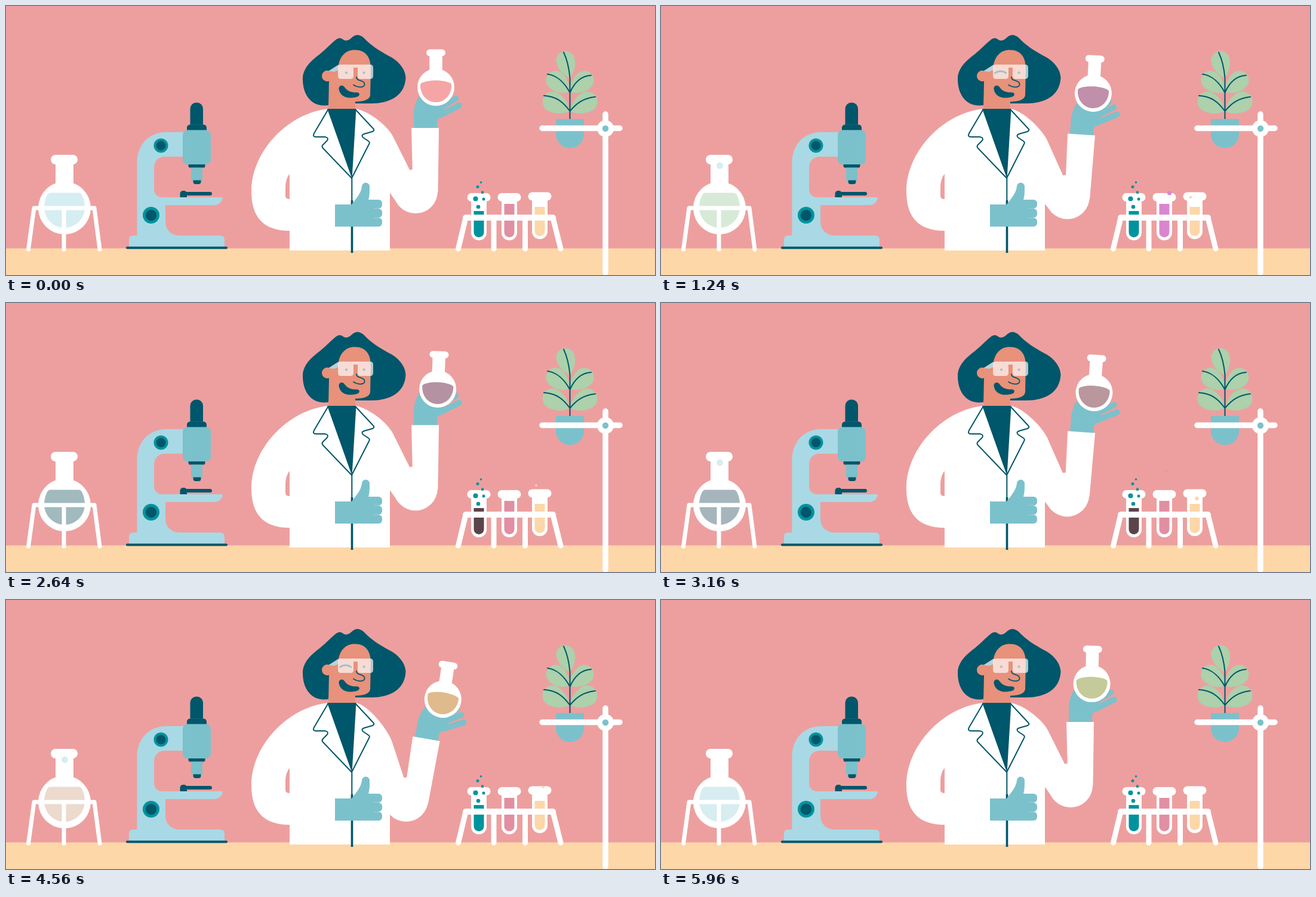
Recreate the animation shown at these times as an HTML page with a canvas. Size 1087 by 450 pixels, loop 6 s.

```html
<!DOCTYPE html>
<html lang="en">
<head>
<meta charset="utf-8">
<title>Laboratory</title>
<style>
html, body { margin: 0; width: 100%; height: 100%; overflow: hidden; background: #ed9f9f; }
canvas { display: block; width: 1087px; height: 450px; }
</style>
</head>
<body>
<canvas id="stage"></canvas>
<script>
const W = 1087, H = 450, LOOP = 6000, STEP = 40, RAD = Math.PI / 180;
const PINK = '#ed9f9f', WHITE = '#ffffff', DARK = '#00566a', TEAL = '#00939d', GOLD = '#fdd7a8';
const GLOVE = '#7bc1cb', PALE = '#a9d9e5', SKIN = '#e8917b', ICE = '#d6edf1', LEAF = '#acd1ab';
const GLASS = 'rgba(255, 255, 255, 0.68)', EYE = '#9fc3ca';
const canvas = document.getElementById('stage');
const g = canvas.getContext('2d');
const ratio = window.devicePixelRatio || 1;
canvas.width = W * ratio;
canvas.height = H * ratio;
g.lineJoin = 'round';

// Drawing helpers
function fill(d, color) {
  g.fillStyle = color;
  g.fill(new Path2D(d));
}
function line(d, color, width, cap = 'round') {
  g.strokeStyle = color;
  g.lineWidth = width;
  g.lineCap = cap;
  g.stroke(new Path2D(d));
}
function disc(x, y, r, color) {
  g.fillStyle = color;
  g.beginPath();
  g.arc(x, y, r, 0, 2 * Math.PI);
  g.fill();
}
function box(x, y, w, h, r, color) {
  g.fillStyle = color;
  g.beginPath();
  g.roundRect(x, y, w, h, r);
  g.fill();
}

// Motion helpers
const clamp = u => Math.min(1, Math.max(0, u));

// Rises from 0 to 1 after `from` and falls back before `to`
const ramp = (t, from, to, ease) => clamp(Math.min(t - from, to - t) / ease);

// One dip and return; skew above 1 delays the peak
function swing(t, from, to, size, skew) {
  const u = clamp((t - from) / (to - from)) ** skew;
  return size * (1 - Math.cos(2 * Math.PI * u)) / 2;
}

function mix(a, b, u) {
  const part = i => {
    const v = parseInt(a.slice(i, i + 2), 16), w = parseInt(b.slice(i, i + 2), 16);
    return Math.round(v + (w - v) * u);
  };
  return `rgb(${part(1)}, ${part(3)}, ${part(5)})`;
}

// Colours spread evenly over the loop
function fade(t, colors) {
  const p = t / LOOP * (colors.length - 1), i = Math.floor(p);
  return mix(colors[i], colors[i + 1], p - i);
}

const TURN = 2580, REST = 5900;
const armDrop = t => swing(t, 0, TURN, 14.5, 1.6) + swing(t, TURN, REST, 29, 0.9);
const flaskDrop = t => swing(t, 0, TURN, 14, 2) + swing(t, TURN, LOOP, 26, 1)
  + 8 * Math.min(t / TURN, 1 - (t - TURN) / 6800);

const flaskColors = ['#f6a5a6', '#c38fab', '#b690a5', '#b3939f', '#dbae8d', '#e2c48c', '#c4ca9c'];
const bowlColors = [ICE, '#e5f5de', '#a9c7c6', '#9cb3ba', '#d8c2be', '#fbecda', ICE];

// A bubble pops up at each spot [x, y, r, hold] in turn
function rise(t, start, spots, color) {
  for (const [x, y, r, hold = 950] of spots) {
    const u = ramp(t, start, start + hold, 120);
    disc(x, y, r * Math.sin(u * Math.PI / 2), color);
    start += hold;
  }
}

function bowl(t) {
  box(75, 249, 45, 16, 8, WHITE);
  box(83, 258, 30, 46, 0, WHITE);
  disc(98, 338, 44, WHITE);
  fill('M74 312.5H122Q125 312.5 127 316C130 322 132 329 132 337A34 34 0 0 1 64 337C64 329 66 322 69 316Q71 312.5 74 312.5Z', fade(t, bowlColors));
  line('M47 338H148M47 338L37.5 407M148 338L157 407M97 338V407', WHITE, 7);
  for (let k = 0; k < 3; k++)
    rise(t, 350 + 1550 * k, [[93, 304, 4.7, 400], [106, 287, 3.2, 350], [98.5, 267, 5.5, 790], [88, 239, 3.2, 750]], ICE);
}

function microscope() {
  fill('M219.5 386V262C219.5 232 240 211 268 211H300V252H266C255 252 248 260 248 270V306C248 314 253 320 262 320H363C362 328 357 333 348 333H267V360C267 375 277 384 292 384H358Q366 384 366 391V404H206V391Q206 384 213 384H219.5Z', PALE);
  line('M203 404.5H369', DARK, 4.2);
  box(308.5, 161.5, 21.5, 38, [10.5, 10.5, 0, 0], DARK);
  box(303, 198.5, 33, 10, [5, 5, 0, 0], DARK);
  line('M309 198.5H330', '#1f6d76', 0.7);
  box(296, 207.5, 47, 57.5, 8, GLOVE);
  box(305.5, 265, 28, 5.5, [0, 0, 3, 3], DARK);
  box(310, 270.5, 19, 21.5, 0, GLOVE);
  box(313.5, 291.5, 13, 6.5, [0, 0, 4, 4], DARK);
  box(296, 311, 49, 6, 3, DARK);
  box(291.5, 309, 11.5, 11, [5, 5, 0, 0], DARK);
  for (const [x, y, r] of [[259.5, 233.5, 12], [243, 350, 14]]) {
    disc(x, y, r, TEAL);
    disc(x, y, r * 0.66, DARK);
  }
}

function tube(x, top, level, foot, color) {
  box(x - 19.5, top, 39, 14, 7, WHITE);
  box(x - 13, top + 6, 26, foot - top - 6, [0, 0, 13, 13], WHITE);
  box(x - 8.5, level, 17, foot - 5 - level, [0, 0, 8.5, 8.5], color);
}

function rack(t) {
  const rose = mix('#e18fa3', '#d986cf', ramp(t, 0, 2040, 800));
  tube(792, 313, 343, 392, mix(TEAL, '#5a444a', ramp(t, 1600, 4480, 780)));
  tube(843, 313, 331, 392, rose);
  tube(894, 311.5, 336, 390, GOLD);
  line('M770 354H916', WHITE, 10);
  line('M770 354L757.5 406M916 354L929 406M817 354V406M869.5 354V406', WHITE, 9);
  for (const [x, y, r] of [[786.5, 322.5, 4.1], [800, 323, 2.5], [791, 336, 3.3], [790, 302.5, 2.5], [795.5, 295, 1.8]])
    disc(x, y, r, TEAL);
  box(796, 309.5, 4, 4.5, 1, TEAL);
  rise(t, 750, [[851.5, 313, 3.6], [846, 300, 2.5], [846, 281, 1.6]], rose);
  rise(t, 3600, [[836, 310.5, 4.5], [835, 293, 2.1]], rose);
  rise(t, 800, [[887, 320, 2.2], [888, 305, 2.6]], GOLD);
  rise(t, 2700, [[897.5, 327, 3.2], [900, 313, 4], [897, 298, 2.2]], GOLD);
}

// Teardrop from its base point to a round end of radius r
function leaf(x, y, dx, dy, r) {
  const d = Math.hypot(dx, dy);
  g.save();
  g.translate(x, y);
  g.rotate(Math.atan2(dy, dx));
  fill(`M0 0C${0.2 * d} ${-0.6 * r} ${0.6 * d} ${-r} ${d} ${-r}A${r} ${r} 0 0 1 ${d} ${r}C${0.6 * d} ${r} ${0.2 * d} ${0.6 * r} 0 0Z`, LEAF);
  g.restore();
}

function plant() {
  leaf(944, 120, -7, -29, 15.5);
  for (const side of [-1, 1]) {
    leaf(944.5 + side, 144, side * 23, -19.5, 16);
    leaf(944.5 + side, 176, side * 28, -16, 17);
  }
  line('M934 77.5C939 88 943 103 944.5 120V190M907 114C923 116 936 129 944.5 145C951 130 962 117 980 116M901 150C921 151 933 160 944.5 176C955 163 967 154 987 152', DARK, 2);
  box(921, 189, 47, 48.5, [0, 0, 23, 23], GLOVE);
  line('M898 204.5H1028M1004 181V446', WHITE, 9.5);
  disc(1004, 205, 14, WHITE);
  disc(1004, 205, 5.2, GLOVE);
}

function head(wink) {
  fill('M497 122C497 105 510 92 525 81C536 72 545 62 553 56C559 52 562 54 566 57C570 59 575 57 579 53C585 47 592 47 599 53C612 67 626 75 642 84C658 92 669 106 669.5 120C668 150 643 163 612 163H540V166C511 170 497 148 497 122Z', DARK);
  fill('M540 172L541 125.5A9 9 0 1 1 541 108.5L557 98C560 84 569 73.5 584 73.5C603 73.5 611 86 611 105L610 149C609 157 600 159.5 585 160V172Z', SKIN);
  fill('M540 109L557 98.5V107L550 110Z', '#b7d3d8');
  fill('M561 98H610Q615 98 615 103V117Q615 122 610 122H594Q589 122 589 117V103H582V117Q582 122 577 122H561Q556 122 556 117V103Q556 98 561 98Z', GLASS);
  if (wink) line('M559.5 112Q569 106 578 112', EYE, 3);
  else disc(570, 111.5, 2.1, EYE);
  disc(599.5, 111.5, 2.1, EYE);
  line('M587 119C586 126 599 123 600.5 130C602 136 592 138 582 132', DARK, 1.8);
  fill('M557.5 139C557 133 563 131 566.5 135C571 142 578 145 588 144.5C593 145 593 150 589 151.5C576 156 560 154 557.5 139Z', DARK);
}

function raisedArm(drop) {
  const turn = 0.4 * drop * RAD, c = Math.cos(turn), s = Math.sin(turn);
  const ex = 686 - 0.45 * drop - 0.008 * drop * drop, ey = 310 + 0.97 * drop;
  const crook = [ex - 5 * c + 26 * s, ey - 5 * s - 26 * c];
  const hinge = [648 - 0.05 * drop, 218 + 0.8 * drop];
  const dx = crook[0] - hinge[0], dy = crook[1] - hinge[1], len = Math.hypot(dx, dy);
  const low = (139 - 0.64 * drop) * RAD;
  const under = [ex + 37 * Math.cos(low), ey + 37 * Math.sin(low)];

  // Upper arm
  fill(`M570 172H586C608 176 ${hinge[0] - 20 * dx / len} ${hinge[1] - 20 * dy / len} ${hinge}L${crook}L${ex} ${ey}L${under}L642 ${311 + 1.9 * drop}L590 300Z`, WHITE);
  disc(ex, ey, 37, WHITE);

  // Glove and forearm turn rigidly about the elbow
  g.save();
  g.translate(ex, ey);
  g.rotate(turn);
  g.translate(-686, -310);
  fill('M683 207V181C683 167 688 156 693 149L733 158V182C727 186 722 189 722 196V207Z', GLOVE);
  line('M759 166.5L727 182.5', GLOVE, 9.8);
  line('M753.5 154.5L728 170M744 147L724 166', GLOVE, 9.2);
  fill('M679 204H725L723.5 311L686 320L681 284Z', WHITE);
  g.restore();
}

function heldFlask(drop, color) {
  g.save();
  g.translate(720 + 0.39 * drop, 136 + drop);
  g.rotate(0.29 * drop * RAD);
  box(-16, -63.5, 32, 11.5, 5.7, WHITE);
  box(-10.7, -56, 21.4, 32, 0, WHITE);
  disc(0, 0, 31, WHITE);
  fill('M-26 -5C-24 -9 -11 -11.5 0 -11.5S24 -9 26 -5C27 12 15 25 0 25S-27 12 -26 -5Z', color);
  g.restore();
}

function coat() {
  fill('M539 172C470 180 411 245 411 310C411 352 430 376 475 376V409H643V240L586 172Z', WHITE);
  fill('M475 281C470 287 468 295 468 304V318Q468 323 475 323Z', PINK);
}

function front() {
  fill('M538 172H586.5L579.5 289Z', DARK);
  line('M539 174L516 213Q513 219 519 219H534Q541 220 538 225L531 232Q528 235 531 238L579 288L608 231Q610 228 607 226L598 220Q594 216 600 214L614 210Q618 208 615 205L586 174', DARK, 2);
  line('M579.3 288V328', DARK, 2, 'butt');
  line('M579.5 325V413', DARK, 3.6, 'butt');
  fill('M551 332H579C583 326 595 314 596 302A6.5 6.5 0 0 1 609 302C609 311 609 318 607 324H616V369H551Z', GLOVE);
  for (let i = 0; i < 3; i++) box(600, 324 + 15.1 * i, 30, 14.8, 6, GLOVE);
}

function draw(t) {
  g.setTransform(ratio, 0, 0, ratio, 0, 0);
  box(0, 0, W, H, 0, PINK);
  box(0, 405.5, W, 45, 0, GOLD);
  bowl(t);
  microscope();
  plant();
  rack(t);
  coat();
  raisedArm(armDrop(t));
  heldFlask(flaskDrop(t), fade(t, flaskColors));
  head((t >= 1000 && t < 2600) || (t >= 3500 && t < 4600));
  front();
}

const begin = performance.now();
function tick() {
  const t = (performance.now() - begin) % LOOP;
  draw(Math.floor(t / STEP) * STEP);
  requestAnimationFrame(tick);
}
tick();
</script>
</body>
</html>
```
